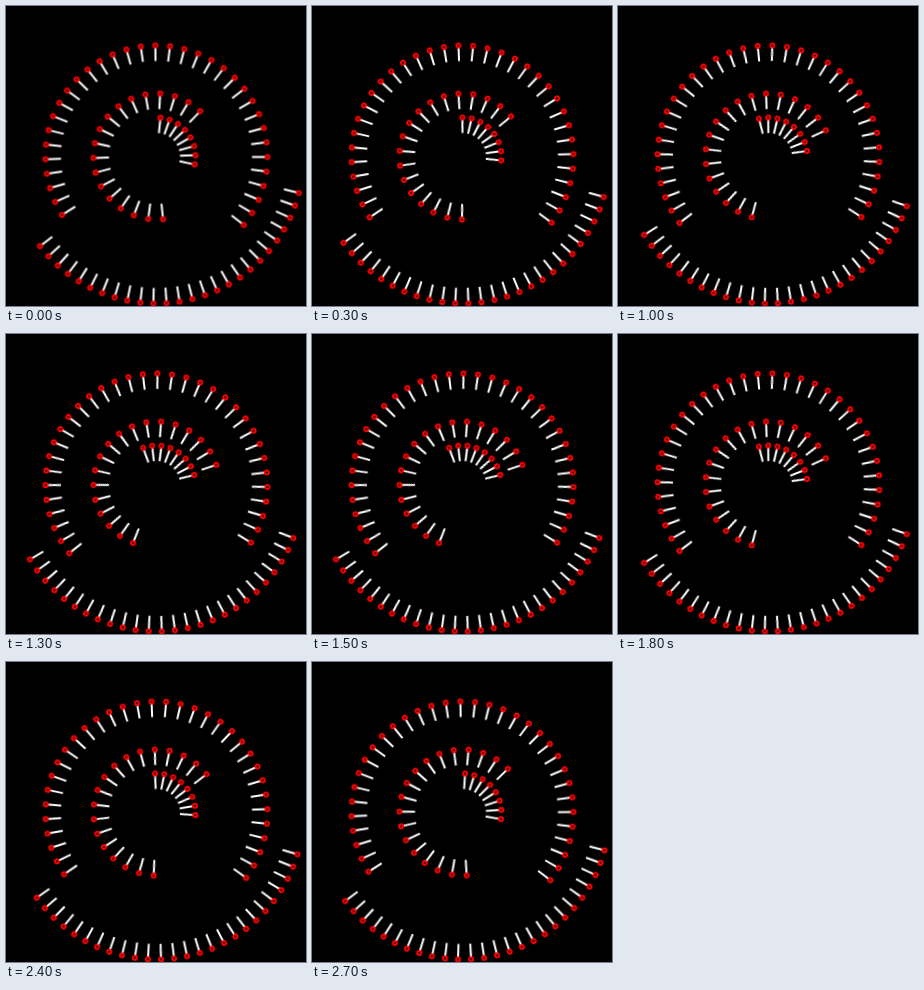
Write an HTML page that moves like this. It is 300 by 300 pixels and loops after 2.8 s.

```html
<!DOCTYPE html>
<html lang="en">
<head>
<meta charset="utf-8">
<title>Swinging arcs of pins</title>
<style>
  html, body { margin: 0; width: 100%; height: 100%; overflow: hidden; background: #000; }
  svg { display: block; width: 100vw; height: 100vh; }
  line { stroke: #fff; stroke-width: 2; }
  circle { fill: #000; stroke: #f00; stroke-width: 2; }
  .arc { animation: swing 2800ms steps(14, end) infinite; }
  @keyframes swing {
    0%, 100% { transform: rotate(0deg); }
    50% { transform: rotate(var(--turn)); }
  }
</style>
</head>
<body>
<svg viewBox="0 0 300 300"><g id="stage" transform="translate(150.5 150.5)"></g></svg>
<script>
  // Angles in degrees, clockwise from the right.
  const arcs = [
    { r: 39, count: 8, start: -84.1, span: 96, turn: -28 },
    { r: 63, count: 18, start: -276, span: 230, turn: 30 },
    { r: 111, count: 34, start: 148.3, span: 249.8, turn: -7 },
    { r: 147, count: 26, start: 14.4, span: 128, turn: 7.5 }
  ];

  function add(parent, tag, attrs) {
    const el = document.createElementNS(parent.namespaceURI, tag);
    for (const key in attrs) el.setAttribute(key, attrs[key]);
    return parent.appendChild(el);
  }

  const stage = document.getElementById('stage');
  for (const { r, count, start, span, turn } of arcs) {
    const arc = add(stage, 'g', { class: 'arc', style: `--turn: ${turn}deg` });
    for (let i = 0; i < count; i++) {
      const angle = start + span * i / (count - 1);
      const pin = add(arc, 'g', { transform: `rotate(${angle})` });
      add(pin, 'line', { x1: r - 15.5, x2: r - 2 });
      add(pin, 'circle', { cx: r, r: 2 });
    }
  }
</script>
</body>
</html>
```
